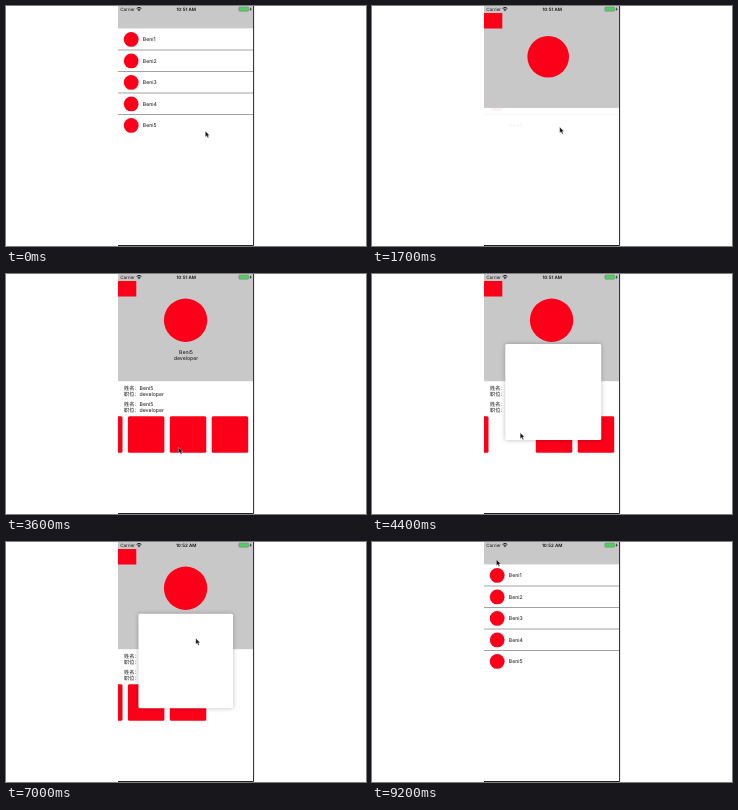
Write an HTML page that moves like this. It is 360 px wide and 240 px high and loops after 9.3 s.

```html
<!DOCTYPE html>
<html lang="en">
<head>
<meta charset="utf-8">
<title>Card transitions</title>
<style>
  html, body { margin: 0; width: 100%; height: 100%; overflow: hidden; background: #fff; }
  svg { display: block; width: 360px; height: 240px; }
  text { font: 5.2px Inter, "Noto Sans CJK SC", "Noto Sans CJK", sans-serif; fill: #111; text-rendering: geometricPrecision; }
  .status { font-size: 4.5px; }
  .bold { font-weight: 600; }
  .mid { text-anchor: middle; }
  .red { fill: #fc0019; }
  #modal { fill: #fff; filter: drop-shadow(0 0 2px rgba(0, 0, 0, .28)); }
</style>
</head>
<body>
<svg viewBox="0 0 360 240">
  <defs><clipPath id="screen"><rect x="112" y="0" width="135.5" height="239.5"/></clipPath></defs>
  <g clip-path="url(#screen)">
    <g id="list"></g>
    <rect id="header" x="112" y="0" width="136" height="22" fill="#c8c8c8"/>
    <rect id="back" class="red" x="112" y="7" width="18.3" height="15.5"/>
    <circle id="avatar" class="red"/>
    <g id="details">
      <text class="mid" x="180" y="80">Beni5</text>
      <text class="mid" x="180" y="86.3">developer</text>
      <g id="info"></g>
      <g id="cards"></g>
    </g>
    <rect id="modal" rx="1.5"/>
    <text class="status" x="114.3" y="4.9">Carrier</text>
    <g fill="none" stroke="#111" stroke-width=".9">
      <path d="M130.6 2.4Q133 .2 135.4 2.4M131.6 3.6Q133 2.4 134.4 3.6"/>
      <circle cx="133" cy="4.6" r=".3"/>
    </g>
    <text id="clock" class="status bold mid" x="180.2" y="4.9"></text>
    <rect x="232.8" y="1" width="10" height="4.2" rx="1" fill="#51cf60" stroke="#777" stroke-width=".5"/>
    <path d="M245 1L243.6 3.4H244.6L244.2 5.2L245.8 2.8H244.7Z" fill="#111"/>
  </g>
  <path d="M247.6 0V239.5H112" fill="none" stroke="#222" stroke-width="1"/>
  <path id="cursor" d="M0 0V6L1.4 4.8L2.4 7L3.5 6.5L2.5 4.4H4.3Z" fill="#111" stroke="#fff" stroke-width=".35"/>
</svg>
<script>
const LOOP = 9300, STEP = 100;
const PITCH = 41.9, CARD = 36.5, CARD_Y = 142.3, SCROLL = 38;
const $ = id => document.getElementById(id);

function add(parent, tag, attrs, text) {
  const el = document.createElementNS("http://www.w3.org/2000/svg", tag);
  set(el, attrs);
  if (text) el.textContent = text;
  return parent.appendChild(el);
}
function set(el, attrs) {
  for (const k in attrs) el.setAttribute(k, attrs[k]);
}

const clamp = v => Math.min(1, Math.max(0, v));
const lerp = (a, b, p) => a + (b - a) * p;
const span = (t, from, to) => clamp((t - from) / (to - from));
const inOut = p => p < .5 ? 4 * p ** 3 : 1 - 4 * (1 - p) ** 3;
const smooth = p => p * p * (3 - 2 * p);
const out = p => 1 - (1 - p) ** 3;

// Underdamped spring, peaking at about 400 ms
function spring(ms) {
  const z = .74, w = 11.67, d = Math.sqrt(1 - z * z), s = ms / 1000;
  return 1 - Math.exp(-z * w * s) * (Math.cos(w * d * s) + z / d * Math.sin(w * d * s));
}

// Time, x, y
const path = [
  [0, 199.3, 125], [200, 211, 123.7], [300, 211, 123.7], [700, 187.7, 121],
  [1900, 187.7, 121], [2600, 214.7, 176.7], [2900, 214.7, 176.7],
  [3400, 177, 176], [3500, 177, 176], [3900, 148.2, 158.7], [4400, 148.2, 158.7],
  [4800, 163.5, 200.5], [5300, 163.5, 200.5], [5900, 212, 171], [6400, 212, 171],
  [7000, 189.8, 96.3], [7700, 189.8, 96.3], [8300, 124.4, 17.6]
];
function cursorAt(t) {
  const i = path.findIndex(k => k[0] > t);
  if (i < 0) return path.at(-1).slice(1);
  const a = path[i - 1], b = path[i], p = smooth(span(t, a[0], b[0]));
  return [lerp(a[1], b[1], p), lerp(a[2], b[2], p)];
}

const popups = [
  { card: 1, open: 4000, close: 4800, landed: 5200 },
  { card: 3, open: 6400, close: 7400, landed: 7800 }
];
const FADE = 200;

let lastDot;
for (let i = 0; i < 5; i++) {
  const y = 33.4 + 21.5 * i;
  lastDot = add($("list"), "circle", { class: "red", cx: 125.2, cy: y, r: 7.4 });
  add($("list"), "text", { x: 136.8, y: y + 1.8 }, "Beni" + (i + 1));
  if (i < 4) add($("list"), "path", { d: `M112 ${y + 10.6}H248`, stroke: "#666", "stroke-width": .6 });
}
for (const y of [116, 131.7]) {
  [["姓名：", "Beni5"], ["职位：", "developer"]].forEach(([label, value], i) => {
    add($("info"), "text", { x: 118, y: y + 6.2 * i }, label);
    add($("info"), "text", { x: 133.5, y: y + 6.2 * i }, value);
  });
}
const cards = [0, 1, 2, 3].map(i => add($("cards"), "rect", {
  class: "red", x: 118 + PITCH * i, y: CARD_Y, width: CARD, height: CARD, rx: 1.5
}));

function drawPopup(t) {
  const p = popups.find(q => t >= q.open && t < q.landed + FADE);
  cards.forEach((c, i) => set(c, { opacity: p && p.card === i && t <= p.landed ? 0 : 1 }));
  set($("modal"), { visibility: p ? "visible" : "hidden" });
  if (!p) return;
  const k = t < p.close ? spring(t - p.open) : 1 - out(span(t, p.close, p.landed));
  const size = lerp(CARD, 94.2, k), half = CARD / 2;
  const cx = lerp(118 + PITCH * p.card - SCROLL + half, 180, k);
  const cy = lerp(CARD_Y + half, 119.2, k);
  set($("modal"), {
    x: cx - size / 2, y: cy - size / 2, width: size, height: size,
    opacity: 1 - span(t, p.landed, p.landed + FADE)
  });
}

function draw(t) {
  const k = t < 8300 ? inOut(span(t, 1100, 1900)) : 1 - smooth(span(t, 8300, 8800));
  set($("list"), { opacity: 1 - k });
  set(lastDot, { opacity: k > 0 ? 0 : 1 });
  set($("header"), { height: lerp(22.4, 107.2, k) });
  set($("back"), { opacity: clamp(k * 1.1) });
  set($("avatar"), {
    visibility: k > 0 ? "visible" : "hidden",
    cx: lerp(125.2, 179.6, k), cy: lerp(119.4, 46.2, k), r: lerp(7.4, 21.7, k)
  });
  set($("details"), { opacity: t < 8300 ? span(t, 1800, 2200) : 1 - span(t, 8300, 8600) });
  set($("cards"), { transform: `translate(${-SCROLL * smooth(span(t, 2900, 3500))} 0)` });
  drawPopup(t);
  $("clock").textContent = t < 5000 ? "10:51 AM" : "10:52 AM";
  set($("cursor"), { transform: `translate(${cursorAt(t)})` });
}

const start = performance.now();
function tick() {
  const t = (performance.now() - start) % LOOP;
  draw(Math.floor(t / STEP) * STEP);
  requestAnimationFrame(tick);
}
tick();
</script>
</body>
</html>
```
